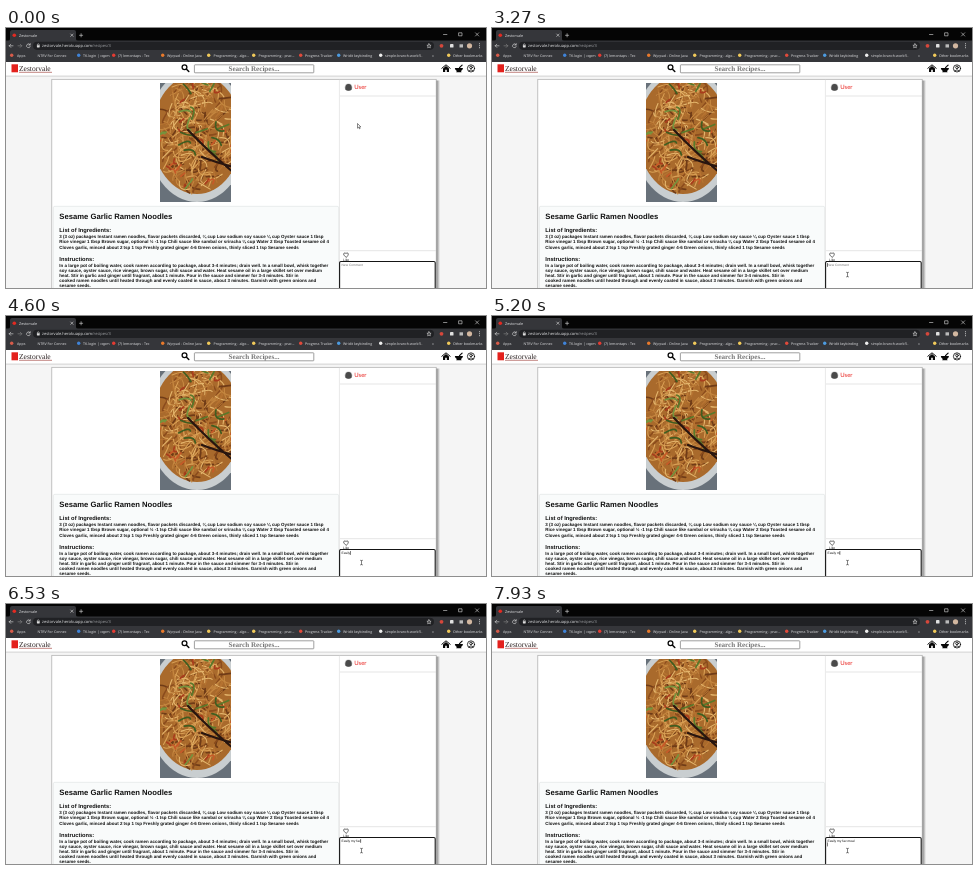
An HTML page that plays this animation: 480 px wide and 260 px high, repeating every 8 s.

```html
<!DOCTYPE html>
<html lang="en">
<head>
<meta charset="utf-8">
<title>Recipe page</title>
<style>
  html, body { margin: 0; width: 100%; height: 100%; overflow: hidden; background: #f5f5f5; }
  svg { display: block; width: 100%; height: 100%; }
  text { font-family: "Liberation Sans", Arial, sans-serif; text-rendering: geometricPrecision; white-space: pre; }
  .ui text { font-family: "Open Sans", "Noto Sans", sans-serif; font-size: 3.75px; fill: #e4e5e7; }
  .serif text { font-family: "Liberation Serif", Times, serif; }
  .recipe text { font-weight: bold; fill: #111; }
  .line { fill: none; stroke-linecap: round; stroke-linejoin: round; }
</style>
</head>
<body>
<svg viewBox="0 0 480 260">
  <defs>
    <clipPath id="photoClip"><rect x="154" y="55" width="71" height="119"/></clipPath>
    <linearGradient id="shadowX"><stop stop-color="#777"/><stop offset="1" stop-color="#f5f5f5"/></linearGradient>
  </defs>

  <!-- Browser window -->
  <g class="ui">
    <rect width="480" height="13" fill="#050505"/>
    <path d="M2 13Q4 13 4 11V4Q4 2 6 2H68Q70 2 70 4V11Q70 13 72 13Z" fill="#35363a"/>
    <rect y="12.5" width="480" height="21.5" fill="#35363a"/>
    <rect x="27" y="13.7" width="401" height="8.2" rx="4.1" fill="#202124"/>
    <circle cx="8.3" cy="7.3" r="1.8" fill="#e22a22"/>
    <text x="13" y="8.8">Zestorvale</text>
    <g class="line" stroke="#dcdcdc" stroke-width=".6">
      <path d="M64.7 6l2.4 2.4m0-2.4l-2.4 2.4M73.5 7.3h3.2m-1.6-1.6v3.2M437.5 6.5h3.4M453 4.8h3v3h-3zM469.5 4.8l3.2 3.2m0-3.2l-3.2 3.2"/>
      <path d="M7 17.8H3.2m1.6-1.6l-1.6 1.6 1.6 1.6"/>
      <path d="M12 17.8h3.8m-1.6-1.6l1.6 1.6-1.6 1.6" stroke="#888"/>
      <path d="M24 16.7a1.9 1.9 0 1 0 .3 1.6M24.2 15.5v1.5h-1.5"/>
      <path d="M31.4 17.4v-.7a.9.9 0 0 1 1.8 0v.7"/>
      <path d="M423 15.8l.6 1.4 1.5.1-1.1 1 .3 1.5-1.3-.8-1.3.8.3-1.5-1.1-1 1.5-.1z"/>
    </g>
    <rect x="30.9" y="17.3" width="2.8" height="2.2" rx=".4" fill="#ddd"/>
    <text x="36" y="19.4" font-size="4.1" style="font-size:4.05px">zestorvale.herokuapp.com<tspan fill="#a2a4a8">/recipes/3</tspan></text>
    <circle cx="435.5" cy="17.8" r="1.9" fill="#d6473b"/>
    <rect x="444" y="16.1" width="3.5" height="3.5" rx=".7" fill="#e0e0e0"/>
    <rect x="453.5" y="16.3" width="3.5" height="3.2" fill="#bbb"/>
    <circle cx="463.5" cy="17.8" r="2.6" fill="#d2b7a0"/>
    <path d="M473.5 15.7v.1m0 1.9v.1m0 1.9v.1" class="line" stroke="#ddd" stroke-width=".9"/>
    <g id="bookmarks"></g>
  </g>

  <!-- Site header -->
  <rect y="34" width="480" height="14" fill="#fff"/>
  <rect y="47.6" width="480" height="1" fill="#d2d2d2"/>
  <rect x="5.5" y="36.3" width="6.5" height="8" fill="#e3211d"/>
  <g class="serif">
    <text x="13" y="43.1" font-size="7.5" fill="#2b2020">Zestorvale</text>
    <path d="M13 44.3H46" stroke="#98322d" stroke-width=".6"/>
    <rect x="188.4" y="36.8" width="119.4" height="8" rx=".6" fill="#fff" stroke="#777" stroke-width=".7"/>
    <text x="248" y="43.2" font-size="7.1" font-weight="bold" text-anchor="middle" fill="#777">Search Recipes...</text>
  </g>
  <g class="line" stroke="#080808">
    <circle cx="178.5" cy="39.2" r="2.4" stroke-width="1.3"/>
    <path d="M180.5 41.2l2.3 2.3" stroke-width="1.5"/>
    <path d="M435.8 40.3l4.2-3.5 4.2 3.5" stroke-width="1"/>
    <path d="M437 40.4l3-2.4 3 2.4v3.6h-2.2v-2.3h-1.6v2.3H437z" fill="#080808" stroke="none"/>
    <path d="M448.8 40h8.2q-.2 2.2-2 3.1l.6 1.2h-5.4l.6-1.2q-1.8-.9-2-3.1z" fill="#080808" stroke="none"/>
    <path d="M453.5 39.6l2.6-2.5" stroke-width="1.2"/>
    <circle cx="465" cy="40.4" r="3.6" stroke-width=".8"/>
    <circle cx="465" cy="39.4" r="1.3" stroke-width=".8"/>
    <path d="M462.7 42.9q2.3-2.6 4.6 0" stroke-width=".8"/>
  </g>

  <!-- Recipe card -->
  <rect x="430" y="52.5" width="4" height="208" fill="url(#shadowX)"/>
  <rect x="45.8" y="51.3" width="384.4" height="215" fill="#fff" stroke="#aaa" stroke-width=".7"/>
  <path d="M333.4 51.5V260" stroke="#d9d9d9" stroke-width=".6"/>
  <path d="M334 68H430M334 222.7H430" stroke="#d4d4d4" stroke-width=".6"/>
  <rect x="47.3" y="178.3" width="285.4" height="90" rx="1.5" fill="#f9fbfb" stroke="#dcdfdf" stroke-width=".6"/>
  <g id="photo" clip-path="url(#photoClip)"></g>
  <g class="recipe" id="recipe"></g>

  <!-- Side column -->
  <circle cx="342.5" cy="59.3" r="3.8" fill="#c8c8c8"/>
  <path d="M339.3 61.4q-.4-5.3 3.2-5.4 3.8.1 3.2 5.4-3.2 2.5-6.4 0z" fill="#4a4a4a"/>
  <text x="348.3" y="61.4" font-size="6" fill="#e8201c" style="font-family:Lato,'Open Sans',sans-serif">User</text>
  <path d="M340 229.2l-2.1-2.1q-.7-1.2.2-2 1-.7 1.9.5.9-1.2 1.9-.5.9.8.2 2z" class="line" stroke="#222" stroke-width=".65"/>
  <text x="337" y="233.2" font-size="3.4" fill="#222">Like</text>
  <rect x="333.6" y="233.5" width="95.6" height="35" rx="1.3" fill="#fff" stroke="#151515" stroke-width="1.1"/>
  <text id="hint" x="335.5" y="238.2" font-size="3.25" fill="#757575">New Comment</text>
  <text id="comment" x="335.5" y="238.2" font-size="3.25" fill="#111"></text>
  <rect id="caret" width=".5" height="3.9" fill="#000"/>

  <path id="arrow" d="M0 0V4.7L1.1 3.7 1.9 5.3 2.6 5 1.9 3.4H3.3Z" fill="#fff" stroke="#111" stroke-width=".5"/>
  <path id="beam" d="M-1-2.3Q0-2.3 0-1.9Q0-2.3 1-2.3M0-1.9V1.9M-1 2.3Q0 2.3 0 1.9Q0 2.3 1 2.3" class="line" stroke="#333" stroke-width=".6"/>
</svg>
<script>
const $ = id => document.getElementById(id);

// Bookmarks: x of icon, colour, label
const bookmarks = [
  [4, '#d65b4a', 'Apps', 11], [25, '', 'NTRV For Connec', 31.5], [71, '#3f83d8', 'TK.login | cqpm', 77],
  [106, '#e33b32', '(7) lemontaps - Tec', 112], [155, '#e8792b', 'Wyrpad - Online Java', 161],
  [201, '#f0c95a', 'Programming - algo...', 207.5], [246, '#f0c95a', 'Programming - prac...', 252.5],
  [293, '#e04a3b', 'Progress Tracker', 299], [331, '#4c9be0', 'Wridit keybinding', 337],
  [373, '#ededed', 'simple-branch-workfl..', 379], [441, '#f0c95a', 'Other bookmarks', 447]
];
$('bookmarks').innerHTML = bookmarks.map(([x, color, label, textX]) =>
  (color ? `<circle cx="${x + 1.7}" cy="27.3" r="1.7" fill="${color}"/>` : '') +
  `<text x="${textX}" y="28.8" style="font-size:3.6px">${label}</text>`).join('') +
  '<text x="426" y="28.8">»</text>';

const recipe = [
  [191.1, 7.68, 'Sesame Garlic Ramen Noodles'],
  [203.9, 5.76, 'List of Ingredients:'],
  [210.2, 4.49, '3 (3 oz) packages Instant ramen noodles, flavor packets discarded, ¼ cup Low sodium soy sauce ¼ cup Oyster sauce 1 tbsp'],
  [215.4, 4.49, 'Rice vinegar 1 tbsp Brown sugar, optional ½ -1 tsp Chili sauce like sambal or sriracha ¼ cup Water 2 tbsp Toasted sesame oil 4'],
  [220.6, 4.49, 'Cloves garlic, minced about 2 tsp 1 tsp Freshly grated ginger 4-6 Green onions, thinly sliced 1 tsp Sesame seeds'],
  [232.9, 5.76, 'Instructions:'],
  [238.7, 4.49, 'In a large pot of boiling water, cook ramen according to package, about 3-4 minutes; drain well. In a small bowl, whisk together'],
  [243.8, 4.49, 'soy sauce, oyster sauce, rice vinegar, brown sugar, chili sauce and water. Heat sesame oil in a large skillet set over medium'],
  [248.9, 4.49, 'heat. Stir in garlic and ginger until fragrant, about 1 minute. Pour in the sauce and simmer for 3-4 minutes. Stir in'],
  [254, 4.49, 'cooked ramen noodles until heated through and evenly coated in sauce, about 3 minutes. Garnish with green onions and'],
  [259.1, 4.49, 'sesame seeds.']
];
$('recipe').innerHTML = recipe.map(([y, size, line]) =>
  `<text x="53.3" y="${y}" font-size="${size}">${line}</text>`).join('');

// Noodle dish from seeded strokes
let seed = 11;
const random = (low, high) => {
  seed = (seed * 16807) % 2147483647;
  return low + (high - low) * seed / 2147483647;
};
const stroke = (d, color, width) =>
  `<path d="${d}" class="line" stroke="${color}" stroke-width="${width}"/>`;
const strands = (count, length, colors, width) => Array.from({ length: count }, (_, i) => {
  const angle = random(0, 6.28), dx = Math.cos(angle) * length, dy = Math.sin(angle) * length;
  const bend = random(-7, 7);
  const reach = Math.sqrt(random(0, 1)), around = random(0, 6.28);
  const x = 191 + 40 * reach * Math.cos(around), y = 106 + 55 * reach * Math.sin(around);
  return stroke(`M${x - dx / 2} ${y - dy / 2}q${dx / 2 - bend} ${dy / 2 + bend} ${dx} ${dy}`, colors[i % colors.length], width);
}).join('');
$('photo').innerHTML =
  '<rect x="154" y="55" width="71" height="119" fill="#68717a"/>' +
  '<ellipse cx="191" cy="107" rx="50" ry="67" fill="#c9ced0"/>' +
  '<ellipse cx="191" cy="106" rx="45" ry="60" fill="#a96a2c"/>' +
  strands(75, 14, ['#6f3b17', '#8b4c1d'], 1.6) +
  strands(210, 13, ['#d9a055', '#c58740', '#e4b56c', '#b77432'], 1.1) +
  strands(20, 5, ['#a93c1c', '#c75a28'], 1.7) +
  strands(19, 12, ['#59792b', '#76933e', '#405d20'], 1.7) +
  stroke('M182 102Q205 126 227 144M196 129Q212 135 227 139', '#28150f', 2.2);

// Typed comment: the time each character lands
const message = 'Easily my fav meal\n';
const keyTimes = [3730, 3870, 3930, 4070, 4270, 4400, 4730, 5130, 5270, 5470, 5730, 5930, 6130, 6600, 6670, 6800, 6930, 7070, 7470];
const BLINK = 533.4;

// Pointer path: time, x, y
const pointerPath = [
  [0, 351.5, 95.5], [67, 351.5, 95.5], [200, 378, 99], [400, 417, 114], [1400, 417, 114],
  [1530, 400, 195], [1600, 380, 240], [1670, 366, 266], [1800, 361, 266], [1870, 359, 252],
  [2000, 357, 249], [2200, 355.5, 246], [2460, 355.5, 246], [2470, 355.5, 246.6], [8000, 355.5, 246.6]
];
function pointerAt(t) {
  const i = pointerPath.findIndex(p => p[0] > t);
  const [t0, x0, y0] = pointerPath[i - 1], [t1, x1, y1] = pointerPath[i];
  const k = (t - t0) / (t1 - t0);
  return [x0 + (x1 - x0) * k, y0 + (y1 - y0) * k];
}

const show = (el, visible) => el.setAttribute('visibility', visible ? 'visible' : 'hidden');

function render(t) {
  const count = keyTimes.filter(time => time <= t).length;
  const newLine = count === message.length;
  $('comment').textContent = message.slice(0, count).trimEnd();
  show($('hint'), !count);

  const typedWidth = count ? $('comment').getComputedTextLength() + (message[count - 1] === ' ' ? 0.9 : 0) : 0;
  const blinkStart = count ? keyTimes[count - 1] : 67;
  show($('caret'), t >= blinkStart && Math.floor((t - blinkStart) / BLINK) % 2 === 0);
  $('caret').setAttribute('x', 335.4 + (newLine ? 0 : typedWidth));
  $('caret').setAttribute('y', newLine ? 238.5 : 235);

  const [x, y] = pointerAt(t);
  const overField = y > 234;
  show($('arrow'), !overField);
  show($('beam'), overField);
  $(overField ? 'beam' : 'arrow').setAttribute('transform', `translate(${x} ${y})`);
}

function frame() {
  render(performance.now() % 8000);
  requestAnimationFrame(frame);
}
frame();
</script>
</body>
</html>
```
